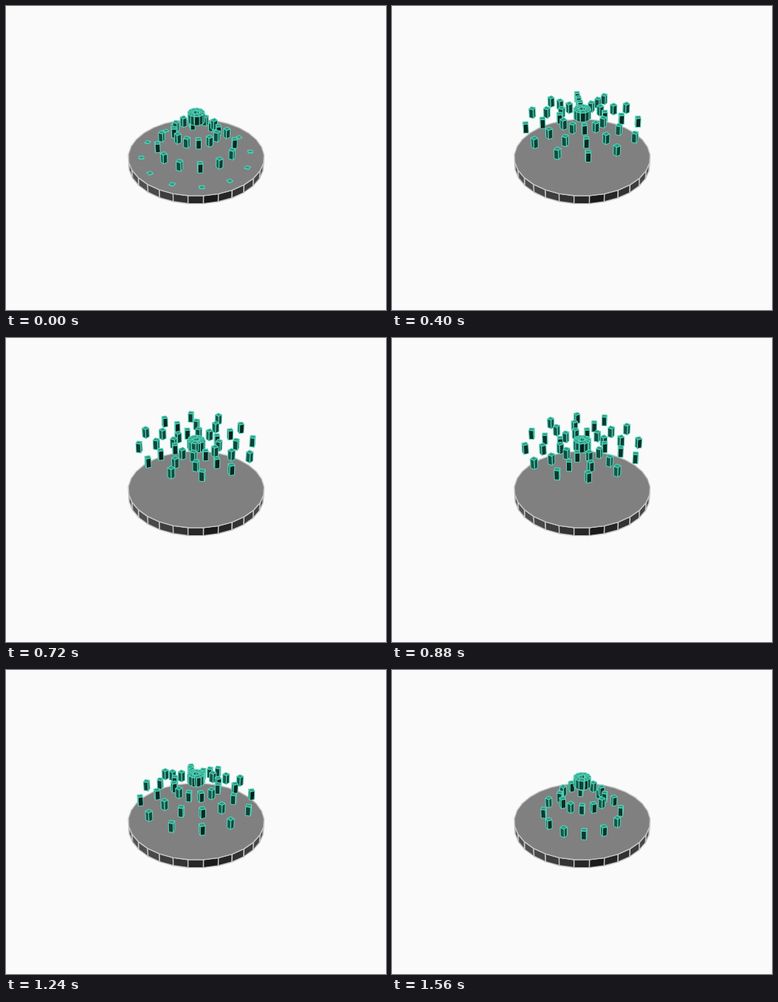
Animation of 513 by 410 pixels, one loop 1.6 s. Source, as an HTML page with a canvas:

```html
<!DOCTYPE html>
<html>
<head>
<meta charset="utf-8">
<style>
html, body { margin: 0; height: 100%; overflow: hidden; background: #fafafa; }
canvas { display: block; }
</style>
</head>
<body>
<canvas id="stage" width="513" height="410"></canvas>
<script>
const ctx = document.getElementById('stage').getContext('2d');
const LOOP = 1600, STEP = 40, RAD = Math.PI / 180;
const SIN = Math.sin(34.5 * RAD), COS = Math.cos(34.5 * RAD), DIST = 947;
const AZIMUTH = 5.6;
const RADII = [73.6, 51.5, 29.4, 7.4];
const PER_RING = 12, BOX_WIDTH = 6.3, BOX_HEIGHT = 13.4;
const DISC_RADIUS = 91.2, DISC_TOP = 6.2, DISC_BOTTOM = -6.3;
const APEX = 72.5, SLOPE = 1.075;
const GREY = { fill: [128, 128, 128], line: '#c6c6c6', width: 1.4 };
const TEAL = { fill: [38, 158, 136], line: '#5cd8bc', width: 1 };

// x points right, y towards the viewer, z up
function project([x, y, z]) {
  const k = DIST / (DIST - y * COS - z * SIN);
  return [256.8 + x * k, 205.4 + (y * SIN - z * COS) * k];
}

function face(points, { fill, line, width }, shade) {
  ctx.beginPath();
  points.forEach(p => ctx.lineTo(...p));
  ctx.closePath();
  ctx.fillStyle = `rgb(${fill.map(v => Math.round(v * shade))})`;
  ctx.fill();
  ctx.strokeStyle = line;
  ctx.lineWidth = width;
  ctx.stroke();
}

function prism(x, y, bottom, top, radius, sides, turn, style) {
  const step = 360 / sides;
  const rim = z => Array.from({ length: sides }, (_, i) => {
    const a = (turn + i * step) * RAD;
    return project([x + radius * Math.sin(a), y + radius * Math.cos(a), z]);
  });
  const upper = rim(top), lower = rim(bottom);
  for (let i = 0; i < sides; i++) {
    const j = (i + 1) % sides;
    if (upper[j][0] <= upper[i][0]) continue;
    const normal = turn + (i + 0.5) * step;
    const shade = 0.2 + 0.48 * Math.abs(Math.sin((normal - 12) * RAD));
    face([upper[i], upper[j], lower[j], lower[i]], style, shade);
  }
  face(upper, style, 1);
}

function draw(t) {
  const phase = t / LOOP;
  const lift = Math.sin(Math.PI * (phase + STEP / LOOP) % Math.PI);
  const boxes = [];
  RADII.forEach((r, ring) => {
    const z = APEX - SLOPE * r * (1 - lift);
    if (z + BOX_HEIGHT / 2 < DISC_TOP) return;
    for (let i = 0; i < PER_RING; i++) {
      const angle = AZIMUTH + i * 360 / PER_RING + ring * 120 * phase;
      boxes.push({ x: r * Math.sin(angle * RAD), y: r * Math.cos(angle * RAD), z, angle });
    }
  });
  boxes.sort((a, b) => a.y * COS + a.z * SIN - b.y * COS - b.z * SIN);

  ctx.fillStyle = '#fafafa';
  ctx.fillRect(0, 0, 513, 410);
  ctx.lineJoin = 'round';
  prism(0, 0, DISC_BOTTOM, DISC_TOP, DISC_RADIUS, 30, AZIMUTH, GREY);
  for (const { x, y, z, angle } of boxes) {
    const bottom = Math.max(z - BOX_HEIGHT / 2, DISC_TOP);
    prism(x, y, bottom, z + BOX_HEIGHT / 2, BOX_WIDTH / Math.SQRT2, 4, angle + 360 * phase + 45, TEAL);
  }
}

const start = performance.now();
function tick() {
  const t = (performance.now() - start) % LOOP;
  draw(Math.floor(t / STEP) * STEP);
  requestAnimationFrame(tick);
}
tick();
</script>
</body>
</html>
```
